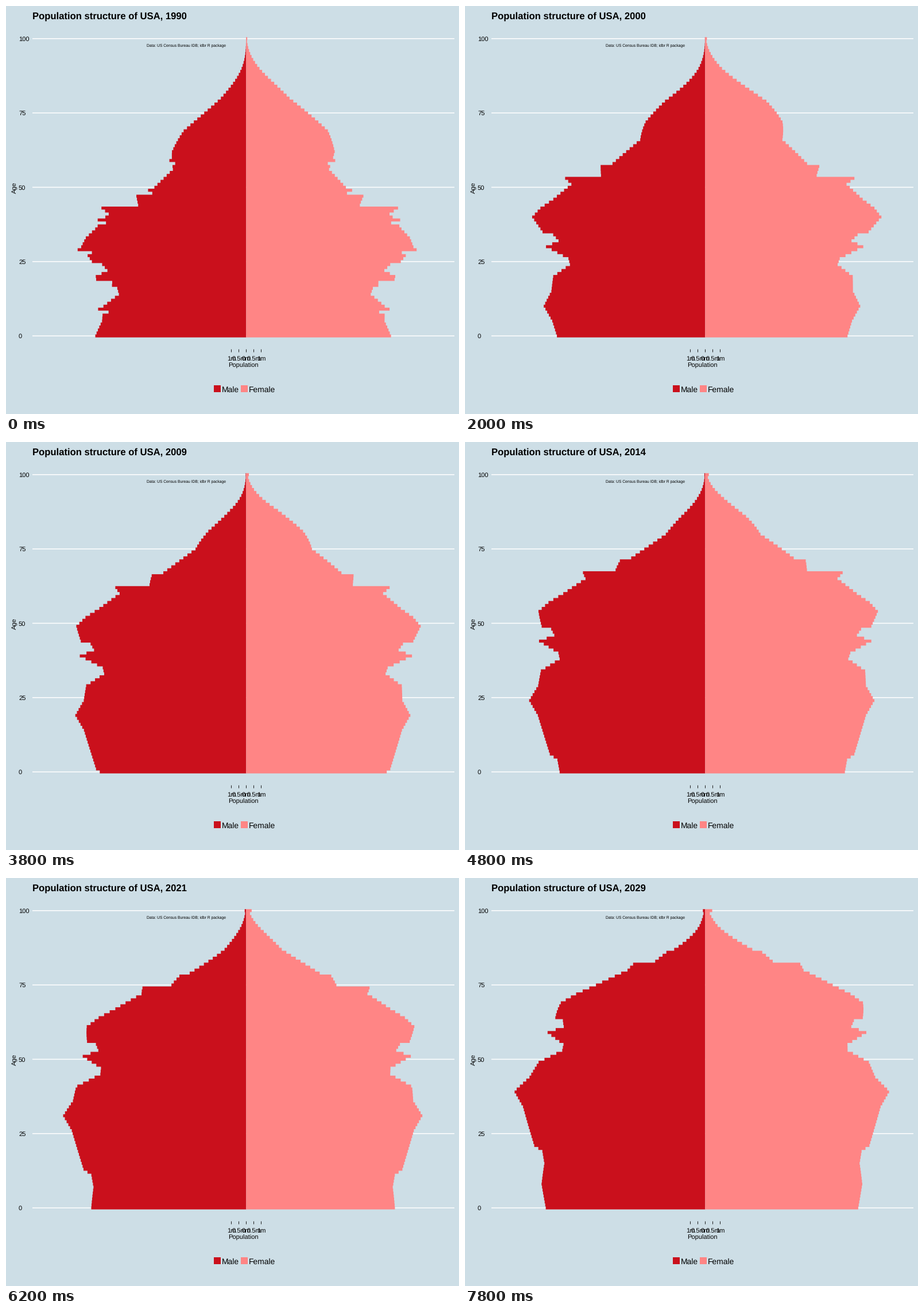
Animation, 789 px wide and 710 px high, one loop 8 s. Source, as a matplotlib script:

```python
import matplotlib.pyplot as plt
import numpy as np
from matplotlib.animation import FuncAnimation
from matplotlib.patches import Polygon, Rectangle

W, H, DPI = 789, 710, 100
START, STEPS, STEP_MS = 1990, 40, 200
MID_X, ZERO_Y, AGE_H = 418.3, 574.1, 5.173
BG, MALE, FEMALE = "#cddee6", "#ca101c", "#ff8585"

plt.rcParams["font.family"] = "Liberation Sans"
plt.rcParams["text.hinting"] = "none"

AGES = np.arange(101)

# Turning points of cohort size: birth year -> bar length in pixels
COHORTS = {
    1900: 103, 1910: 113, 1921: 149, 1928: 151, 1934: 139, 1942: 177,
    1943: 198, 1946: 193, 1947: 258, 1949: 244, 1954: 272, 1957: 293,
    1960: 306, 1965: 294, 1966: 276, 1968: 269, 1970: 295, 1974: 259,
    1976: 259, 1980: 298, 1985: 311, 1990: 337, 1995: 330, 2008: 333,
    2010: 321, 2014: 325, 2021: 346, 2029: 356,
}


def survival(year, scale, slope, progress):
    """Gompertz mortality that eases a little every year."""
    hazard = scale * np.exp(slope * (AGES - 80) - progress * (year - 2009))
    return np.exp(-hazard)


def cohort_sizes(year):
    size = np.interp(year - AGES, list(COHORTS), list(COHORTS.values()))
    size *= .78 + .0055 * np.minimum(AGES, 40)  # immigration fills young cohorts
    if year < 2000:  # reported ages slip from 18 to 19, 28 to 29, ...
        size[8:60:10] *= .96
        size[9:60:10] *= 1.035
    size[100] *= 2.1  # the last bar holds everyone of 100 and over
    return size


def men(year):
    return cohort_sizes(year) * survival(year, .75, .1, .012)


def women(year):
    ratio = np.interp(year - AGES, [1905, 1945, 1985], [1.2, 1.04, .96])
    return ratio * cohort_sizes(year) * survival(year, .47, .108, .01)


def outline(width, side):
    edges = ZERO_Y - (np.arange(102) - .5) * AGE_H
    x = MID_X + side * np.repeat(width, 2)
    y = np.repeat(edges, 2)[1:-1]
    return np.column_stack([np.r_[MID_X, x, MID_X], np.r_[y[0], y, y[-1]]])


fig = plt.figure(figsize=(W / DPI, H / DPI), dpi=DPI, facecolor=BG)
ax = fig.add_axes([0, 0, 1, 1])
ax.set_xlim(0, W)
ax.set_ylim(H, 0)
ax.axis("off")


def label(x, y, text, size=8, **kw):
    return ax.text(x, y, text, fontsize=size, **{"va": "baseline", **kw})


def line(x, y, color, lw):
    ax.plot(x, y, color=color, lw=lw, solid_capstyle="butt", snap=False, zorder=1)


def bars(width, side, color):
    shape = Polygon(outline(width, side), fc=color, lw=0, snap=False, zorder=2)
    return ax.add_patch(shape)


for age in range(0, 101, 25):
    y = ZERO_Y - age * AGE_H
    line([46, 781], [y, y], "white", 1.1)
    label(22, y + 4, str(age))

left = bars(men(START), -1, MALE)
right = bars(women(START), 1, FEMALE)

for i, text in enumerate(["1m", "0.5m", "0m", "0.5m", "1m"]):
    x = 392.5 + 13 * i
    line([x, x], [597.5, 602.5], "#222222", .75)
    label(x, 617, text, ha="center")

for x, color, text in [(362, MALE, "Male"), (409, FEMALE, "Female")]:
    ax.add_patch(Rectangle((x, 660), 12, 12, fc=color, lw=0))
    label(x + 14, 671.5, text, 10)

label(413.5, 629, "Population", ha="center")
label(15, 316, "Age", ha="center", va="center", rotation=90)
label(245.5, 70.5, "Data: US Census Bureau IDB; idbr R package", 4.86)
title = label(46, 22, "", 12, weight="bold")


def draw(step):
    year = START + step
    title.set_text(f"Population structure of USA, {year}")
    left.set_xy(outline(men(year), -1))
    right.set_xy(outline(women(year), 1))
    return title, left, right


anim = FuncAnimation(fig, draw, frames=STEPS, interval=STEP_MS,
                     repeat=True, repeat_delay=0)
plt.show()
```
